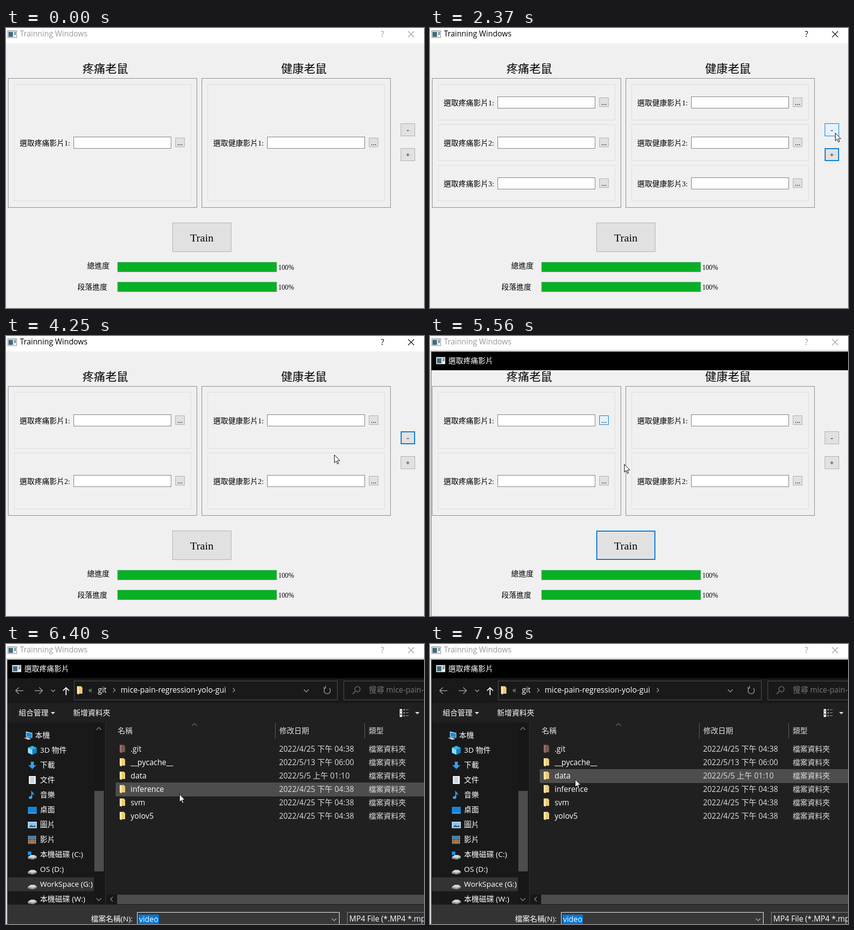
An HTML page that plays this animation: 842x564 px, repeating every 8 s.

```html
<!DOCTYPE html>
<html lang="zh-TW">
<head>
<meta charset="utf-8">
<title>Trainning Windows</title>
<style>
html, body { margin: 0; width: 100%; height: 100%; overflow: hidden; background: #f0f0f0; }
svg { display: block; width: 842px; height: 564px; }
rect { shape-rendering: crispEdges; }
text { white-space: pre; }
.ui { font: 15.4px "Open Sans", "Noto Sans CJK TC", "Noto Sans CJK", sans-serif; }
.form { font: 300 15px "Liberation Serif", "Noto Sans CJK TC", "Noto Sans CJK", serif; }
</style>
</head>
<body>
<svg viewBox="0 0 842 564" lang="zh-TW">
  <defs>
    <linearGradient id="shade" x2="0" y2="1">
      <stop stop-color="#fff"/><stop offset="1" stop-color="#c4c4c4"/>
    </linearGradient>
  </defs>
  <g id="back"></g>
  <g id="window"></g>
  <g id="shell"></g>
  <g id="hover"></g>
  <g id="content"></g>
  <path id="cursor" fill="#fff" stroke="#000" stroke-linejoin="round"
    d="M.5 .5V16.2L4.1 12.8L6.6 18.8L9 17.8L6.5 12H11.4Z"/>
</svg>
<script>
const LOOP = 8000;
const layer = id => document.getElementById(id);

// Runs of picture changes: first time, last time, number of steps.
const RUNS = [
  [190, 950, 11], [1020, 1150, 3], [1290, 1290, 1], [2020, 2580, 9], [2780, 3060, 5],
  [3280, 3560, 5], [3830, 4250, 7], [4450, 5150, 11], [5280, 5560, 5], [5650, 6040, 6],
  [6110, 6400, 5], [6470, 6880, 6], [6950, 7300, 6], [7630, 7980, 6]
];
const TICKS = [0, ...RUNS.flatMap(([a, b, n]) =>
  Array.from({ length: n }, (_, i) => Math.round(a + (n > 1 ? i * (b - a) / (n - 1) : 0))))];

// Pointer path: time, x, y.
const PATH = [
  [190, 827, 525], [874, 815, 252], [1020, 816, 252], [1150, 819, 252], [2090, 819, 252],
  [2370, 816, 211], [2580, 816, 203], [2710, 816, 203], [3060, 816, 193], [3280, 816, 194],
  [3420, 819, 196], [3560, 816, 193], [3760, 816, 193], [4250, 661, 239], [4380, 661, 239],
  [4520, 666, 236], [5150, 349, 170], [5420, 349, 170], [5560, 391, 258], [6040, 384, 284],
  [6400, 349, 302], [6880, 332, 345], [7090, 325, 362], [7300, 320, 368], [7560, 320, 368],
  [7980, 292, 272]
];
const PRESSES = [[874, 1020], [2020, 2090], [3280, 3350], [5280, 5420]];

const between = (t, a, b) => t >= a && t < b;

function pointerAt(t) {
  const i = PATH.findIndex(p => p[0] > t);
  if (i === 0) return { x: -50, y: -50 };
  if (i < 0) return { x: 292, y: 272 };
  const [t0, x0, y0] = PATH[i - 1], [t1, x1, y1] = PATH[i];
  const k = (t - t0) / (t1 - t0);
  return { x: Math.round(x0 + (x1 - x0) * k), y: Math.round(y0 + (y1 - y0) * k) };
}

const fillRect = (x, y, w, h, fill) =>
  `<rect x="${x}" y="${y}" width="${w}" height="${h}" fill="${fill}"/>`;
const box = (x, y, w, h, stroke, fill = 'none', line = 1) =>
  `<rect x="${x + line / 2}" y="${y + line / 2}" width="${w - line}" height="${h - line}" fill="${fill}" stroke="${stroke}" stroke-width="${line}"/>`;
const text = (x, y, s, fill = '#000', extra = '') =>
  `<text x="${x}" y="${y}" fill="${fill}" ${extra}>${s}</text>`;
const line = (d, stroke, width = 1, extra = '') =>
  `<path d="${d}" fill="none" stroke="${stroke}" stroke-width="${width}" ${extra}/>`;
const shape = (d, fill) => `<path d="${d}" fill="${fill}"/>`;
const at = (x, y, s) => `<g transform="translate(${x} ${y})">${s}</g>`;
const group = (cls, s) => `<g class="${cls}">${s}</g>`;

const appIcon = (x, y) => at(x, y,
  box(0, 0, 19, 15, '#858c91', '#fff') + fillRect(1, 1, 17, 2, '#d5dadd') +
  fillRect(2, 3, 9, 10, '#426b7c') + fillRect(12, 3, 2, 10, '#c9d4d8') + fillRect(14, 3, 3, 6, '#7a939d'));

const folder = (x, y, dim) => at(x, y,
  shape('M1 0H10V2H12V15H4L1 14Z', dim ? '#75594d' : '#f0cb74') +
  shape('M1 0L5 2V17L1 15Z', dim ? '#8e7061' : '#ffe7a8'));

function buildBack() {
  const bar = y => box(224, y, 322, 21, '#bcbcbc', '#06b025') +
    text(548.5, y + 16, '100%', '#000', 'font-size="13.6"');
  const panel = x => box(x, 101, 381, 261, '#828790');
  layer('back').innerHTML =
    fillRect(0, 0, 842, 564, '#f0f0f0') + fillRect(0, 0, 842, 31, '#fff') + appIcon(3, 5) +
    group('form',
      text(154, 90, '疼痛老鼠', '#000', 'font-size="23"') +
      text(554, 90, '健康老鼠', '#000', 'font-size="23"') +
      panel(4) + panel(394) +
      text(163.5, 484, '總進度') + text(144, 527, '段落進度') + bar(471) + bar(511));
}

function button(x, y, w, h, label, state, focus, size = 15, drop = 5) {
  const { p, pressed } = state;
  const over = p.x >= x && p.x < x + w && p.y >= y && p.y < y + h;
  const hot = over && !state.away;
  const fill = hot ? (pressed ? '#cce4f7' : '#e5f1fb') : '#e1e1e1';
  const edge = hot && pressed ? '#005499' : hot || focus ? '#0078d7' : '#adadad';
  return box(x, y, w, h, edge, fill, focus ? 2 : 1) +
    text(x + w / 2, y + h / 2 + drop, label, '#000', `text-anchor="middle" font-size="${size}"`);
}

function fileRows(count, state, opening) {
  const h = (236 - 8 * (count - 1)) / count;
  let out = '';
  for (let i = 0; i < count; i++) {
    const top = Math.round(113 + i * (h + 8)), bottom = Math.round(113 + i * (h + 8) + h);
    const cy = Math.round((top + bottom) / 2);
    ['疼痛', '健康'].forEach((kind, side) => {
      const x = side * 390;
      const held = opening && !i && !side;
      const rowState = held ? { p: { x: 349, y: 170 } } : state;
      out += box(x + 16, top, 357, bottom - top, '#dcdcdc') +
        text(x + 27.5, cy + 6, `選取${kind}影片${i + 1}:`) +
        box(x + 136, cy - 12, 197, 24, '#7a7a7a', '#fff') +
        button(x + 341, cy - 10, 19, 19, '...', rowState, false);
    });
  }
  return out;
}

function drawWindow(t, p) {
  const active = between(t, 874, 5490), opening = t >= 5490;
  const state = { p, pressed: PRESSES.some(([a, b]) => between(t, a, b)), away: opening };
  const count = t < 1020 ? 1 : between(t, 2090, 3350) ? 3 : 2;
  const ink = active ? '#000' : '#999';
  layer('window').innerHTML =
    group('ui', text(28, 17, 'Trainning Windows', ink) + text(755, 18, '?', ink)) +
    line('M810 6.5L822 18.5M822 6.5L810 18.5', ink, 1.1) +
    group('form', fileRows(count, state, opening) +
      button(795, 192, 29, 26, '-', state, between(t, 3280, 5490)) +
      button(795, 242, 29, 26, '+', state, between(t, 874, 3280)) +
      button(335, 392, 119, 59, 'Train', state, opening, 22, 8.5));
}

function sideIcons() {
  const drive = at(0, 3, shape('M0 2L6 -2H13L18 1V4L10 7L0 5Z', '#d8d8d8') +
    shape('M0 2L10 4L18 1V4L10 7L0 5Z', '#929292') + fillRect(12, 4, 2, 1, '#5fe36a'));
  const photo = box(0, -6, 18, 13, '#eee', '#8fc6ef') + shape('M2 5L7 0L11 3L14 1L16 5Z', '#2d678f');
  const film = fillRect(0, -8, 17, 17, '#555') + fillRect(4, -7, 9, 7, '#3388c8') + fillRect(4, 1, 9, 7, '#b37742') +
    line('M2 -7V8M15 -7V8', '#ddd', 1.5, 'stroke-dasharray="2 2"');
  return [
    shape('M0 -5L9 -9L18 -5V5L9 9L0 5Z', '#35aee8') + shape('M0 -5L9 -1V9L0 5Z', '#8bdcff') + shape('M9 -1L18 -5V5L9 9Z', '#1682c0'),
    shape('M6 -7H12V0H17L9 8L1 0H6Z', '#3b9bec'),
    shape('M2 -8H16V8H2Z', '#f1f1f1') + line('M5 -4.5H13M5 -1.5H13M5 1.5H13M5 4.5H13', '#6fa0c4'),
    shape('M8 -8C9 -4 14 -4 12 2C12 -1 10 -2 9 -2V5A3.5 3 0 1 1 7 2.5V-8Z', '#3a9ff0'),
    fillRect(0, -6, 18, 14, '#1385dc') + fillRect(1, 6, 16, 1, '#71c8ff'),
    photo, film,
    drive + fillRect(0, -6, 7, 7, '#1b91e5'), drive, drive, drive
  ];
}

function buildShell() {
  layer('shell').innerHTML =
    fillRect(0, 27, 842, 4, 'url(#shade)') + fillRect(0, 31, 2, 533, '#e3e3e3') +
    fillRect(2, 31, 840, 533, '#707070') + fillRect(3, 32, 839, 37, '#000') + appIcon(12, 42) +
    group('ui', text(37, 55, '選取疼痛影片', '#fff', 'font-size="15"')) +
    `<g id="veil"></g>` +
    `<g id="blank">${fillRect(3, 69, 839, 495, '#191919') + fillRect(3, 119, 839, 39, '#202020') +
      fillRect(201, 158, 641, 367, '#202020') + fillRect(3, 525, 839, 39, '#333')}</g>`;
}

// Redraws only the frame of the dialog while its body is still empty.
function buildFrame() {
  layer('shell').innerHTML = layer('shell').innerHTML
    .replace(fillRect(2, 31, 840, 533, '#707070').replace('/>', '></rect>'),
      fillRect(2, 31, 840, 1, '#707070') + fillRect(2, 31, 1, 533, '#707070'));
}

function buildContent() {
  const cjk = 'font-size="15"', soft = '#dedede';
  const chevron = (x, y, c) => line(`M${x - 2} ${y - 4}L${x + 2} ${y}L${x - 2} ${y + 4}`, c, 1.2);
  const down = (x, y, c, r = 5) => line(`M${x - r} ${y - r / 2}L${x} ${y + r / 2}L${x + r} ${y - r / 2}`, c, 1.4);
  const caret = (x, y) => shape(`M${x} ${y}h9l-4.5 4.5z`, soft);

  const nav =
    line('M35 94H20M26 87.5L19.5 94L26 100.5M58 94H73M67 87.5L73.5 94L67 100.5', '#a0a0a0', 1.5) +
    down(95, 94, '#a0a0a0', 4) + line('M121 103V88M115 94L121 88L127 94', '#fff', 1.8) +
    box(137, 74, 531, 39, '#535353') + folder(142, 85) +
    text(166, 98, '«', '#aaa') + text(185, 98, 'git', '#fff') + chevron(218, 93, '#aaa') +
    text(231, 98, 'mice-pain-regression-yolo-gui', '#fff') + chevron(459, 93, '#aaa') +
    down(605, 94, '#a0a0a0') +
    line('M651.5 89A6.5 6.5 0 1 1 643 88.5M643.5 84V88.5H639', '#a0a0a0', 1.4) +
    box(680, 74, 180, 39, '#535353') +
    line('M703.5 95.5L698 101', '#777', 1.4) + '<circle cx="708" cy="91" r="5.3" fill="none" stroke="#777" stroke-width="1.3"/>' +
    text(731, 98, '搜尋 mice-pain-regression-yolo-gui', '#777');

  const view = [131, 137, 143].map(y => fillRect(800, y, 4, 3, '#777') + fillRect(806, y + 1, 5, 1, '#aaa')).join('');
  const tools = text(25.5, 144, '組合管理', '#fff', cjk) + caret(90, 137) + text(135, 144, '新增資料夾', '#fff', cjk) +
    fillRect(793, 131, 5, 16, '#eee') + fillRect(794, 134, 3, 2, '#d18a4a') + fillRect(794, 140, 3, 3, '#666') + view + caret(824, 137);

  const names = ['3D 物件', '下載', '文件', '音樂', '桌面', '圖片', '影片', '本機磁碟 (C:)', 'OS (D:)', 'WorkSpace (G:)', '本機磁碟 (W:)'];
  const icons = sideIcons();
  const side = fillRect(4, 470, 173, 28, '#333') +
    at(36, 185, shape('M4 -9L17 -6V4L4 2Z', '#b8dff4') + shape('M5 -7L16 -5V3L5 1Z', '#188ed8') + shape('M0 4L7 3L15 6L9 8Z', '#d5d5d5')) +
    text(58.5, 189, '本機', '#fff', cjk) +
    names.map((s, i) => at(44, 214 + i * 30, icons[i]) + text(68.5, 219 + i * 30, s, '#fff', 'font-size="15.1"')).join('') +
    fillRect(178, 158, 19, 367, '#171717') + fillRect(178, 296, 19, 162, '#4d4d4d') +
    line('M182 173L187 168L192 173M182 512L187 517L192 512', '#8a8a8a', 1.4) + fillRect(200, 158, 1, 367, '#2f2f2f');

  const head = text(225, 180, '名稱', soft, cjk) + text(550.5, 180, '修改日期', soft, cjk) + text(730.5, 180, '類型', soft, cjk) +
    line('M374.5 164.5L379.5 160L384.5 164.5', '#aaa') + fillRect(542, 159, 1, 31, '#636363') + fillRect(722, 159, 1, 31, '#636363');
  const late = '2022/4/25 下午 04:38';
  const rows = [['.git', late], ['__pycache__', '2022/5/13 下午 06:00'], ['data', '2022/5/5 上午 01:10'],
    ['inference', late], ['svm', late], ['yolov5', late]];
  const list = rows.map(([name, date], i) => {
    const y = 217 + i * 27;
    return folder(228, y - 14, !i) + text(251, y, name, '#fff') + text(550, y, date, soft) + text(730.5, y, '檔案資料夾', soft, cjk);
  }).join('');
  const scroll = fillRect(202, 505, 640, 20, '#171717') + fillRect(224, 505, 618, 19, '#4d4d4d') +
    line('M215 509.5L210.5 514L215 518.5', '#8a8a8a', 1.4);

  const foot = fillRect(3, 525, 839, 39, '#333') + text(171, 559, '檔案名稱(N):', '#fff', cjk) +
    box(264, 540, 408, 40, '#fff', '#383838') + fillRect(267, 545, 41, 19, '#0078d7') + text(268, 560, 'video', '#fff') +
    down(661, 555, '#aaa', 4.5) + box(687, 540, 180, 40, '#8a8a8a', '#333') + text(691.5, 559, 'MP4 File (*.MP4 *.mp4)', '#fff');

  layer('content').innerHTML = group('ui', nav + tools + side + head + list + scroll + foot);
}

const show = (id, on) => { layer(id).style.display = on ? '' : 'none'; };

function draw(t) {
  const p = pointerAt(t);
  drawWindow(t, p);
  show('shell', t >= 5560);
  show('blank', t >= 5650);
  show('content', t >= 5800);
  const row = Math.floor((p.y - 198) / 27);
  layer('hover').innerHTML = t >= 5800 && row >= 0 && row < 6
    ? fillRect(221, 198 + row * 27, 621, 28, '#4d4d4d') : '';
  layer('cursor').setAttribute('transform', `translate(${p.x} ${p.y})`);
}

let shown = -1;
function tick(now) {
  const t = now % LOOP;
  const step = TICKS.filter(s => s <= t).pop();
  if (step !== shown) draw(shown = step);
  requestAnimationFrame(tick);
}

buildBack();
buildShell();
buildFrame();
buildContent();
draw(0);
requestAnimationFrame(tick);
</script>
</body>
</html>
```
